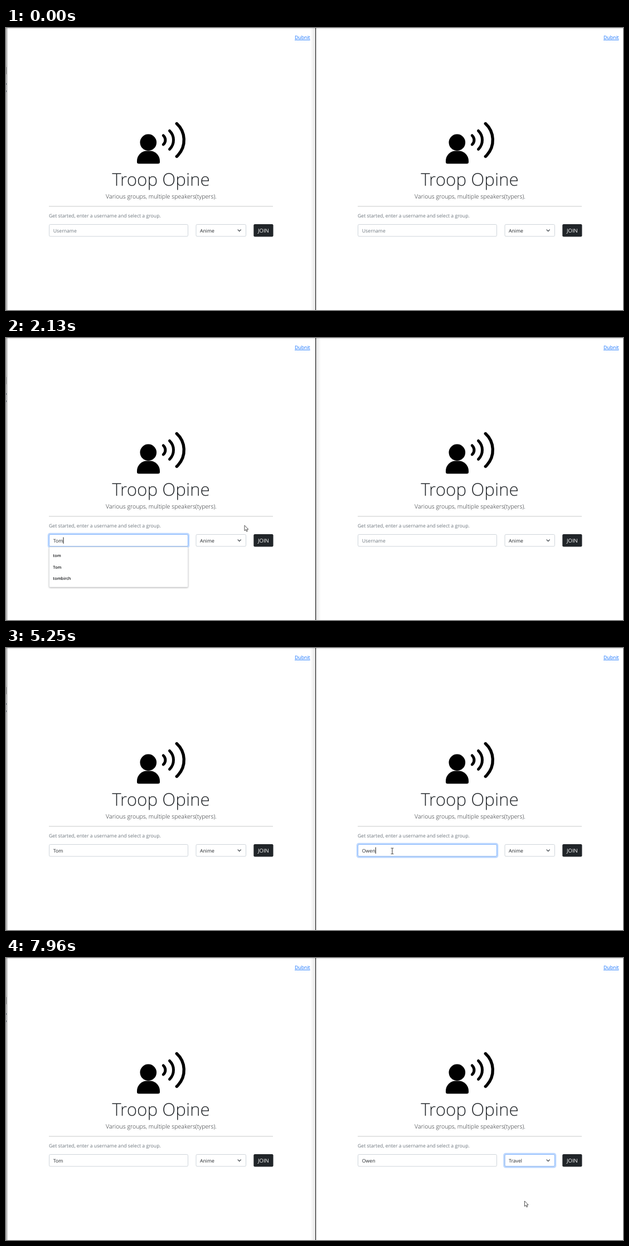
Animation of 1107 by 506 pixels, one loop 8 s. Source, as an HTML page with a canvas:

```html
<!DOCTYPE html>
<html lang="en">
<head>
<meta charset="utf-8">
<title>Troop Opine</title>
<style>
html, body { margin: 0; width: 1107px; height: 506px; overflow: hidden; background: #fff; }
canvas { display: block; }
</style>
</head>
<body>
<canvas id="stage" width="1107" height="506"></canvas>
<script>
const W = 1107, H = 506, LOOP = 8000, PANE = 554, STEP = 77;
const ctx = document.getElementById('stage').getContext('2d');
ctx.textRendering = 'geometricPrecision';

const INK = '#212529', MUTED = '#6c757d', LINE = '#ced4da';
const FIELD = { x: 77, w: 250 }, PICK = { x: 340.5, w: 90.5 }, JOIN = { x: 444.3, w: 35.2 };
const TOP = 352, BOX = 22.4;

// [start time, value]; the last entry already reached applies
const LEFT_TEXT = [[0, ''], [1130, 'T'], [1280, 'To'], [1360, 'Tom']];
const RIGHT_TEXT = [[0, ''], [3230, 'T'], [3380, 'To'], [3460, 'Tom'], [3760, 'To'], [3930, 'T'],
  [4000, ''], [4720, 'O'], [4870, 'Ow'], [5180, 'Owe'], [5250, 'Owen']];
const T_NAMES = ['tom', 'Tom', 'tombirch'];
const ALL_NAMES = [...T_NAMES, 'owen', 'Owen', 'orla'];
const O_NAMES = ['owen', 'Owen', 'owenlark', 'orla', 'Orla', 'otto'];
const LEFT_LIST = [[0, null], [900, ALL_NAMES], [1130, T_NAMES], [2450, null]];
const RIGHT_LIST = [[0, null], [2910, ALL_NAMES], [3230, T_NAMES], [4000, null], [4720, O_NAMES], [4870, null]];
const GROUPS = ['Anime', 'Art', 'Books', 'Gaming', 'Movies', 'Travel', 'Music', 'Science', 'Sports', 'Tech'];
const ROW = 11.8;

// pointer moves: [time, x, y]
const MOVES = [
  [[70, 676, 392], [620, 252, 362], [840, 240, 353]],
  [[1820, 240, 353], [2150, 430, 336], [2550, 693, 364]],
  [[5790, 693, 364], [6130, 795, 412], [6450, 1015, 372], [6600, 1001.5, 365.5]],
  [[6640, 1001.5, 365.5], [6870, 952, 365], [6990, 950, 367], [7260, 930, 437], [7580, 930, 436]]
];
const CLICKS = [[520, 252, 362], [2550, 693, 364], [6130, 795, 412], [6870, 952, 365]];

const at = (list, t) => list.reduce((v, [start, value]) => t >= start ? value : v, list[0][1]);
const clamp = v => Math.max(0, Math.min(1, v));
const fade = (t, on, off) => clamp((t - on) / 150) * (1 - clamp((t - off) / 150));
const within = (t, a, b) => t >= a && t < b;

function pointer(t) {
  if (t < MOVES[0][0][0]) return null;
  const path = MOVES.filter(m => t >= m[0][0]).pop();
  const start = path[0][0];
  const time = start + Math.floor((t - start) / STEP) * STEP;
  const last = path[path.length - 1];
  if (time >= last[0]) return { x: last[1], y: last[2] };
  const i = path.findIndex(p => p[0] > time);
  const [a, b] = [path[i - 1], path[i]];
  const u = (time - a[0]) / (b[0] - a[0]), k = u * u * (3 - 2 * u);
  return { x: a[1] + (b[1] - a[1]) * k, y: a[2] + (b[2] - a[2]) * k };
}

function text(str, x, y, size, color = INK, weight = 400, align = 'left') {
  ctx.font = `${weight} ${size}px "Open Sans", "Noto Sans", sans-serif`;
  ctx.fillStyle = color;
  ctx.textAlign = align;
  ctx.fillText(str, x, y);
  return ctx.measureText(str).width;
}

function rect(x, y, w, h, color) {
  ctx.fillStyle = color;
  ctx.fillRect(x, y, w, h);
}

function round(x, y, w, h, r, fill, stroke, width = 1) {
  ctx.beginPath();
  ctx.roundRect(x, y, w, h, r);
  if (fill) { ctx.fillStyle = fill; ctx.fill(); }
  if (stroke) { ctx.strokeStyle = stroke; ctx.lineWidth = width; ctx.stroke(); }
}

function polygon(points, fill, stroke) {
  ctx.beginPath();
  points.forEach(([x, y]) => ctx.lineTo(x, y));
  ctx.closePath();
  ctx.fillStyle = fill;
  ctx.fill();
  ctx.strokeStyle = stroke;
  ctx.lineWidth = 0.8;
  ctx.stroke();
}

function wave(x, half, sag, width) {
  const r = (half * half + sag * sag) / (2 * sag), a = Math.asin(half / r);
  ctx.beginPath();
  ctx.arc(x + sag - r, 201, r, -a, a);
  ctx.lineWidth = width;
  ctx.stroke();
}

function speaker() {
  ctx.fillStyle = ctx.strokeStyle = '#000';
  ctx.beginPath();
  ctx.arc(255.3, 205.4, 14.8, 0, 7);
  ctx.fill();
  ctx.beginPath();
  ctx.roundRect(235, 220.5, 41, 23, [18, 18, 3, 3]);
  ctx.fill();
  ctx.lineCap = 'round';
  wave(282.3, 8, 3.6, 5);
  wave(293.5, 16.5, 7, 5);
  wave(306.3, 29.5, 13, 5.4);
  ctx.lineCap = 'butt';
}

function control(box, ring) {
  const { x, w } = box;
  if (ring > 0) round(x - 1, TOP - 1, w + 2, BOX + 2, 3, null, `rgba(13,110,253,${0.27 * ring})`, 2.6);
  round(x + 0.5, TOP + 0.5, w - 1, BOX - 1, 2.2, '#fff', LINE);
  if (ring > 0) round(x + 0.5, TOP + 0.5, w - 1, BOX - 1, 2.2, null, `rgba(134,183,254,${ring})`);
}

function names(list) {
  const h = 10 + list.length * 20.7;
  ctx.save();
  ctx.shadowColor = 'rgba(0,0,0,.35)';
  ctx.shadowBlur = 3;
  ctx.shadowOffsetY = 1;
  round(FIELD.x + 0.5, 375, FIELD.w - 1, h, 1.5, '#fff');
  ctx.restore();
  round(FIELD.x + 0.5, 375, FIELD.w - 1, h, 1.5, null, '#d9dbde', 0.7);
  list.forEach((name, i) => text(name, 84.3, 392.8 + i * 20.8, 7.3, '#16181a', 600));
}

function groups(mouse) {
  const y = 374, row = mouse.y > y ? Math.floor((mouse.y - y) / ROW) : 0;
  rect(PICK.x, y, PICK.w, ROW * GROUPS.length + 1, '#8a8d91');
  rect(PICK.x + 0.7, y + 0.5, PICK.w - 1.4, ROW * GROUPS.length, '#fff');
  GROUPS.forEach((name, i) => {
    if (i === row) rect(PICK.x + 0.7, y + 0.5 + i * ROW, PICK.w - 1.4, ROW, '#1e90ff');
    text(name, 348, y + 9.2 + i * ROW, 8.7, i === row ? '#fff' : INK);
  });
}

function pane(state) {
  const link = text('Dubnit', 518, 20, 8.7, '#0d6efd');
  rect(518, 21, link, 0.8, '#0d6efd');
  speaker();
  text('Troop Opine', 278, 282.5, 31.4, INK, 300, 'center');
  text('Various groups, multiple speakers(typers).', 278.5, 306, 10.65, INK, 300, 'center');
  rect(77, 319.5, 402, 1, '#c8c9ca');
  text('Get started, enter a username and select a group.', 77, 339.7, 8.7, MUTED);

  control(FIELD, state.ring);
  const width = text(state.name, 84.8, 366.8, 8.7);
  if (!state.name) text('Username', 84.8, 366.8, 8.7, MUTED);
  if (state.caret) rect(85 + width, 357.5, 0.9, 11.5, '#000');

  control(PICK, state.pickRing);
  text(state.group, 348, 366.8, 8.7);
  ctx.beginPath();
  ctx.moveTo(415.7, 361.7);
  ctx.lineTo(418.7, 364.7);
  ctx.lineTo(421.7, 361.7);
  ctx.strokeStyle = '#343a40';
  ctx.lineWidth = 1.2;
  ctx.stroke();

  round(JOIN.x, TOP, JOIN.w, BOX, 2.2, INK);
  text('JOIN', 461.9, 366.9, 9.5, '#fff', 400, 'center');
  if (state.list) names(state.list);
}

function frameLines(leftActive) {
  rect(0, 0, W, 1, '#dcdcdc');
  rect(0, 70, 1, 13, leftActive ? '#d2d2d2' : '#bdbdbd');
  rect(0, 99, 1, 3, '#9aa4ad');
  rect(0, 112, 1, 3, '#9aa4ad');
  rect(1, 0, 1, H, '#6a6a6a');
  const [from, to] = leftActive ? [556, 565] : [555, 546];
  const shade = ctx.createLinearGradient(from, 0, to, 0);
  shade.addColorStop(0, 'rgba(0,0,0,.1)');
  shade.addColorStop(1, 'rgba(0,0,0,0)');
  rect(Math.min(from, to), 0, 9, H, shade);
  rect(555, 0, 1.2, H, '#1c1c1c');
}

function beam(x, y) {
  rect(x - 0.5, y - 5, 1, 10.5, '#333');
  rect(x - 2.5, y - 5.3, 5, 0.8, '#333');
  rect(x - 2.5, y + 5, 5, 0.8, '#333');
}

function arrow(x, y) {
  polygon([[0, 0], [0, 9.6], [2.2, 7.6], [3.7, 11], [5.3, 10.3], [3.9, 7], [6.8, 7]]
    .map(([a, b]) => [x + 0.4 + a, y + b]), '#fff', '#222');
}

function hand(x, y) {
  polygon([[-1, 0.4], [0, -0.2], [1, 0.4], [1.1, 4.2], [4.6, 5], [5.6, 6], [5.3, 9.4], [4.2, 12.2],
    [-0.9, 12.2], [-3.6, 8], [-3.2, 7], [-1, 8]].map(([a, b]) => [x + a, y + b]), '#fff', '#222');
}

function drawClicks(t) {
  for (const [start, x, y] of CLICKS) {
    const age = t - start;
    if (!within(age, 0, 320)) continue;
    ctx.fillStyle = 'rgba(255,255,60,.72)';
    ctx.beginPath();
    ctx.arc(x - 1.5, y, 13 - 0.032 * age, 0, 7);
    ctx.fill();
  }
}

function drawCursor(p) {
  const x = p.x >= 556 ? p.x - PANE : p.x;
  const over = box => within(x, box.x, box.x + box.w) && within(p.y, TOP, TOP + BOX);
  (over(FIELD) ? beam : over(JOIN) ? hand : arrow)(p.x, p.y);
}

function draw(t) {
  const mouse = pointer(t);
  rect(0, 0, W, H, '#fff');
  frameLines(within(t, 600, 2670));
  pane({
    name: at(LEFT_TEXT, t), list: at(LEFT_LIST, t), group: 'Anime',
    ring: fade(t, 830, 2440), pickRing: 0, caret: within(t, 840, 2450)
  });
  ctx.save();
  ctx.translate(PANE, 0);
  pane({
    name: at(RIGHT_TEXT, t), list: at(RIGHT_LIST, t), group: t < 7890 ? 'Anime' : 'Travel',
    ring: fade(t, 2760, 6160), pickRing: fade(t, 6880, LOOP),
    caret: within(t, 2670, 4000) || within(t, 4470, 6160)
  });
  if (within(t, 6950, 7890)) groups(mouse);
  ctx.restore();
  drawClicks(t);
  if (mouse) drawCursor(mouse);
}

const begin = performance.now();
function tick() {
  draw((performance.now() - begin) % LOOP);
  requestAnimationFrame(tick);
}
tick();
</script>
</body>
</html>
```
